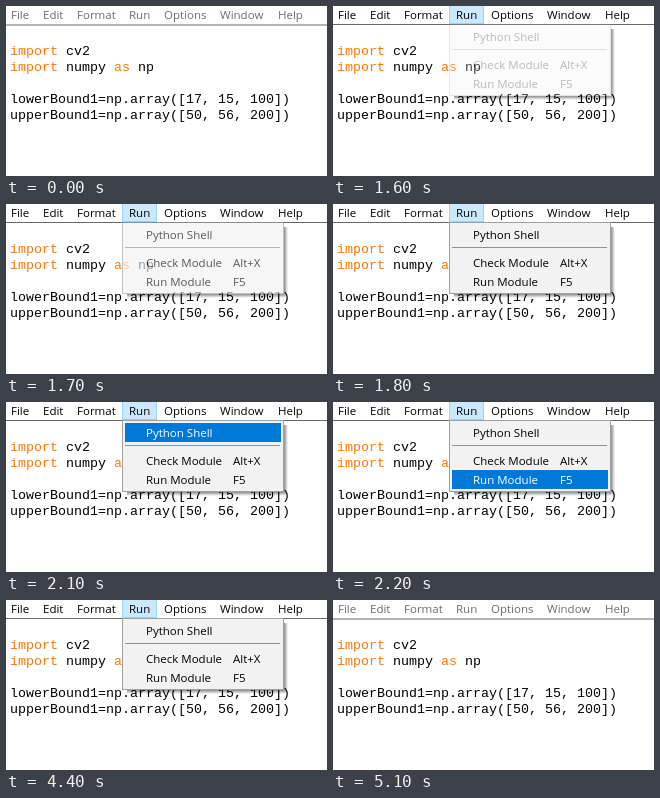
Animation, 321 px wide and 170 px high, one loop 5.2 s. Source, as an HTML page:

```html
<!DOCTYPE html>
<html lang="en">
<head>
<meta charset="utf-8">
<title>Run menu</title>
<style>
  html, body { margin: 0; width: 100%; height: 100%; overflow: hidden; background: #fff; }
  svg { display: block; width: 321px; height: 170px; }
  text { white-space: pre; }
  .ui { font: 11.5px "Open Sans", "Noto Sans", sans-serif; }
  .code { font: 13.333px "Liberation Mono", "Courier New", monospace; }
  .kw { fill: #ff7700; }
</style>
</head>
<body>
<svg viewBox="0 0 321 170">
  <defs>
    <linearGradient id="right"><stop stop-opacity=".45"/><stop offset="1" stop-opacity="0"/></linearGradient>
    <linearGradient id="down" x2="0" y2="1"><stop stop-opacity=".45"/><stop offset="1" stop-opacity="0"/></linearGradient>
    <radialGradient id="corner" cx="0" cy="0" r="1"><stop stop-opacity=".45"/><stop offset="1" stop-opacity="0"/></radialGradient>
  </defs>
  <rect width="321" height="170" fill="#fff"/>
  <rect id="idleEdge" y="18" width="321" height="2" fill="#b4b4b4"/>
  <rect id="focusEdge" y="18" width="321" height="1" fill="#696969"/>

  <g class="code">
    <text x="4" y="49"><tspan class="kw">import</tspan> cv2</text>
    <text x="4" y="65"><tspan class="kw">import</tspan> numpy <tspan class="kw">as</tspan> np</text>
    <text x="4" y="97">lowerBound1=np.array([17, 15, 100])</text>
    <text x="4" y="113">upperBound1=np.array([50, 56, 200])</text>
  </g>

  <rect id="tab" x="116.5" y="-.5" width="34" height="18" fill="#cce8ff" stroke="#99d1ff"/>
  <g id="bar" class="ui"></g>

  <g id="shadow">
    <rect x="278" y="23" width="4" height="67" fill="url(#right)"/>
    <rect x="121" y="90" width="157" height="4" fill="url(#down)"/>
    <rect x="278" y="90" width="4" height="4" fill="url(#corner)"/>
  </g>
  <g id="menu" class="ui">
    <rect x="116.5" y="18.5" width="161" height="71" fill="#f2f2f2" stroke="#a0a0a0"/>
    <rect x="119" y="43" width="155" height="1" fill="#919191"/>
  </g>
</svg>
<script>
const $ = id => document.getElementById(id);
const LOOP = 5200;

// start time, menu opacity, highlighted item
const steps = [
  [0, 0, -1],
  [1600, .27, -1],
  [1700, .65, -1],
  [1800, 1, -1],
  [2100, 1, 0],
  [2200, 1, 2],
  [4400, 1, -1],
  [5100, 0, -1]
];

function add(parent, tag, attrs, label) {
  const el = document.createElementNS("http://www.w3.org/2000/svg", tag);
  for (const key in attrs) el.setAttribute(key, attrs[key]);
  if (label) el.textContent = label;
  return parent.appendChild(el);
}

const titles = [["File", 5], ["Edit", 37], ["Format", 71], ["Run", 123],
  ["Options", 158], ["Window", 214], ["Help", 272]];
for (const [label, x] of titles) add($("bar"), "text", { x, y: 13 }, label);

const entries = [["Python Shell", "", 21], ["Check Module", "Alt+X", 49], ["Run Module", "F5", 68]];
const items = entries.map(([label, key, y]) => {
  const row = add($("menu"), "g", {});
  const back = add(row, "rect", { x: 119, y, width: 156, height: 19, fill: "#0078d7" });
  add(row, "text", { x: 140, y: y + 14 }, label);
  add(row, "text", { x: 227, y: y + 14 }, key);
  return { row, back };
});

const show = (el, visible) => { el.style.opacity = visible ? 1 : 0; };

function draw(time) {
  const t = time % LOOP;
  const [, opacity, active] = steps.findLast(step => step[0] <= t);
  const open = opacity > 0;
  $("menu").style.opacity = opacity;
  for (const id of ["tab", "shadow", "focusEdge"]) show($(id), open);
  show($("idleEdge"), !open);
  $("bar").style.fill = open ? "#000" : "#6d6d6d";
  items.forEach(({ row, back }, i) => {
    row.style.fill = i === active ? "#fff" : "#000";
    show(back, i === active);
  });
}

const start = performance.now();
function tick() {
  draw(performance.now() - start);
  requestAnimationFrame(tick);
}
tick();
</script>
</body>
</html>
```
